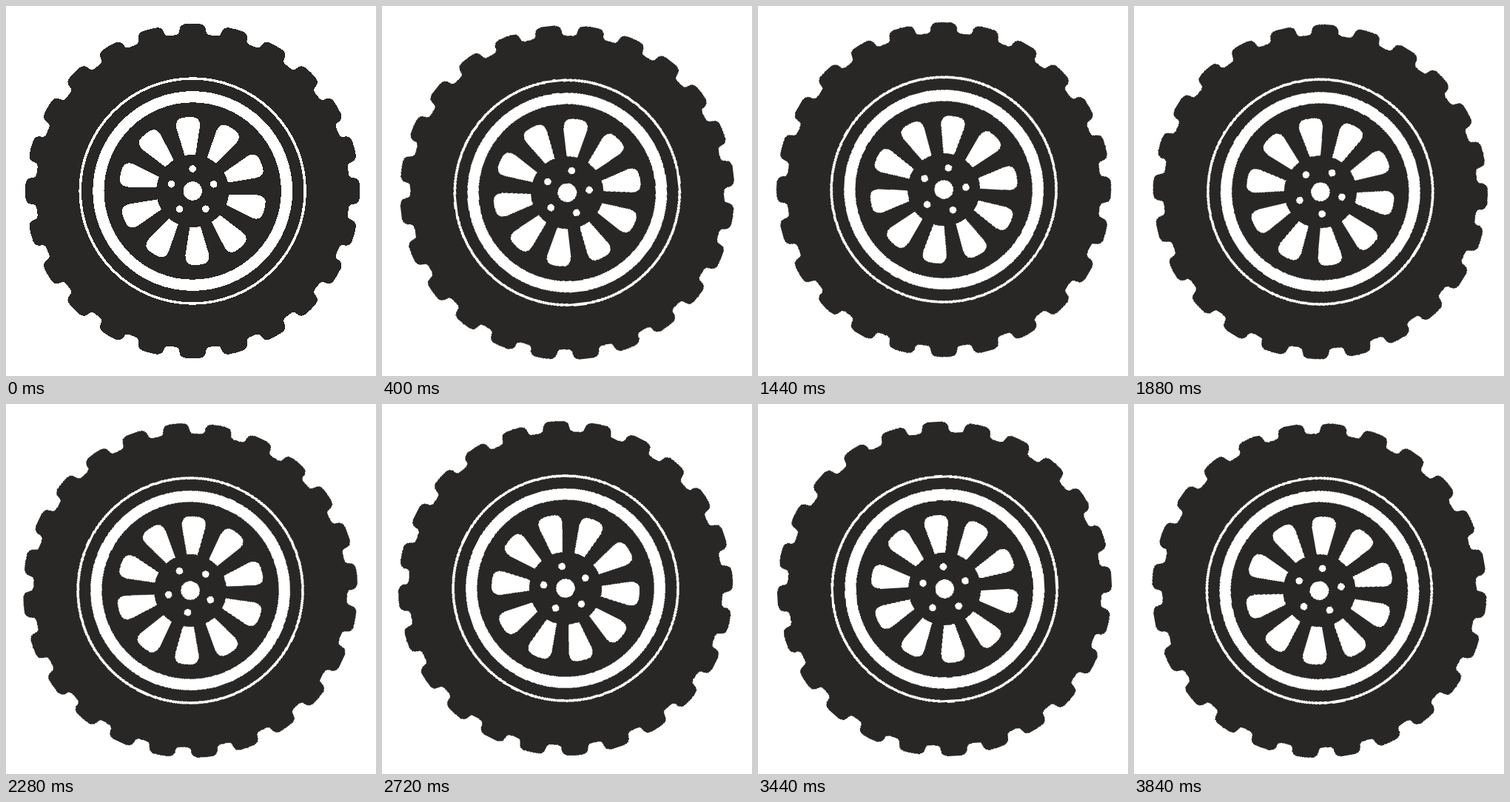
An HTML page for the animation above (3880 ms loop, 500x500 px).

```html
<!DOCTYPE html>
<html lang="en">
<head>
<meta charset="utf-8">
<title>Rolling wheel</title>
<style>
  html, body { margin: 0; width: 100%; height: 100%; overflow: hidden; background: #fff; }
  svg { display: block; width: 100vw; height: 100vh; shape-rendering: crispEdges; }
  /* 97 steps of 25/3 degrees, then a hard restart */
  #spin { transform-origin: 250px 250px; animation: spin 3.88s steps(97, end) infinite; }
  @keyframes spin {
    from { transform: rotate(0deg); }
    to { transform: rotate(808.3333deg); }
  }
  .dark { fill: #282726; }
  .light { fill: #fff; }
  .ring { fill: none; stroke: #fff; }
</style>
</head>
<body>
<svg viewBox="0 0 500 500">
  <g id="spin">
    <!-- the hub sits slightly off the turning point -->
    <g id="wheel" transform="translate(252.2 250)">
      <path id="tread" class="dark"/>
      <circle class="ring" r="152" stroke-width="3.5"/>
      <circle class="ring" r="127.3" stroke-width="15.2"/>
      <circle class="light" r="12.7"/>
    </g>
  </g>
</svg>
<script>
  const wheel = document.getElementById('wheel');

  // Point at radius r, a degrees clockwise from the top
  const polar = (r, a) => {
    const t = a * Math.PI / 180;
    return `${(r * Math.sin(t)).toFixed(2)} ${(-r * Math.cos(t)).toFixed(2)}`;
  };

  const add = (tag, attrs) => {
    const el = document.createElementNS('http://www.w3.org/2000/svg', tag);
    for (const key in attrs) el.setAttribute(key, attrs[key]);
    wheel.appendChild(el);
  };

  const ROOT = 212, TIP = 226.3, LUGS = 24;
  let d = '';
  for (let i = 0; i < LUGS; i++) {
    const a = i * 360 / LUGS;
    const p = (r, off) => polar(r, a + off);
    d += (i ? `A${ROOT} ${ROOT} 0 0 1 ` : 'M') + p(ROOT, -6.5) +
      `Q${p(ROOT, -5)} ${p(216.5, -4.8)}L${p(219.5, -4.6)}` +
      `Q${p(TIP - 0.8, -4.2)} ${p(TIP - 0.3, -2.4)}Q${p(TIP + 0.3, 0)} ${p(TIP - 0.3, 2.4)}` +
      `Q${p(TIP - 0.8, 4.2)} ${p(219.5, 4.6)}L${p(216.5, 4.8)}` +
      `Q${p(ROOT, 5)} ${p(ROOT, 6.5)}`;
  }
  document.getElementById('tread').setAttribute('d', d + 'Z');

  for (let i = 0; i < 10; i++) {
    add('path', {
      class: 'light',
      d: 'M-7.3-48.5L-15.8-86C-17.3-95-13-99.3-6-99.8Q0-100.3 6-99.8C13-99.3 17.3-95 15.8-86L7.3-48.5A49 49 0 0 0-7.3-48.5Z',
      transform: `rotate(${i * 36 - 4})`
    });
  }

  for (let i = 0; i < 5; i++) {
    add('circle', { class: 'light', r: 4.8, cy: -30, transform: `rotate(${i * 72})` });
  }
</script>
</body>
</html>
```
